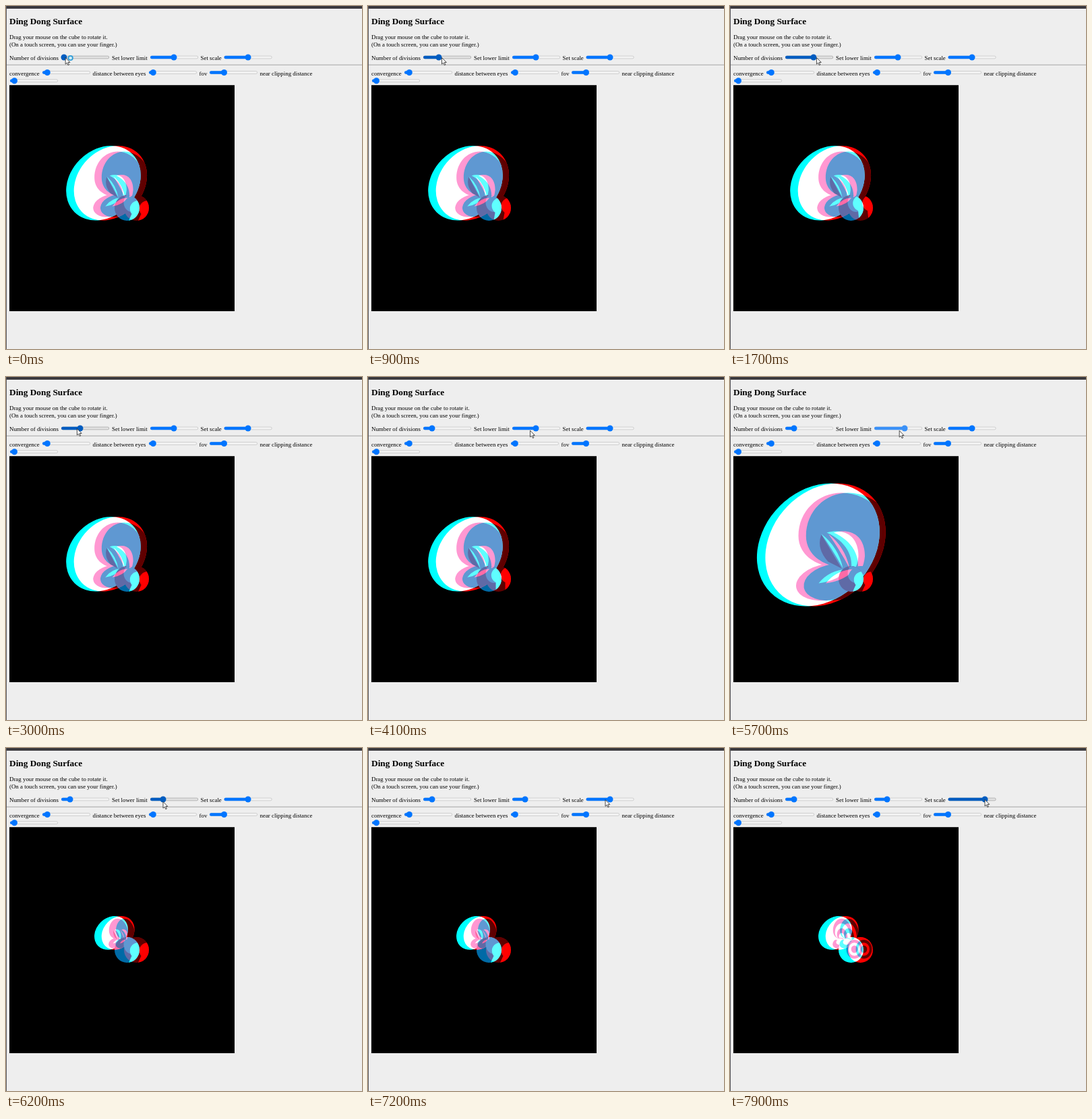
Write an HTML page that moves like this. It is 528x508 px and loops after 8000 ms.

```html
<!DOCTYPE html>
<html lang="en">
<head>
<meta charset="utf-8">
<title>Ding Dong Surface</title>
<style>
  html, body { margin: 0; width: 100%; height: 100%; overflow: hidden; background: #eee; }
  svg { display: block; font: 8.89px "Liberation Serif", "Times New Roman", serif; }
  .title { font-size: 13.33px; font-weight: bold; }
  .scene { isolation: isolate; }
  .eye { mix-blend-mode: screen; }
  .cyan { --hi: #0ff; --mid: #0098d2; --low: #006aa6; }
  .red { --hi: #f00; --mid: #5f0000; --low: #5f0000; }
  .hi { fill: var(--hi); }
  .mid { fill: var(--mid); }
  .low { fill: var(--low); }
</style>
</head>
<body>
<svg width="528" height="508" viewBox="0 0 528 508">
  <defs>
    <clipPath id="rim"><ellipse rx="100" ry="81" transform="translate(-34.6 -35) rotate(-45)"/></clipPath>
    <clipPath id="ball"><ellipse rx="18.5" ry="19"/></clipPath>
  </defs>
  <rect width="528" height="508" fill="#eee"/>
  <rect width="528" height="4" fill="#3b3a3e"/>
  <rect width="1" height="508" fill="#55555a"/>
  <text class="title" x="5" y="27">Ding Dong Surface</text>
  <text x="5" y="49">Drag your mouse on the cube to rotate it.</text>
  <text x="5" y="59.5">(On a touch screen, you can use your finger.)</text>
  <text x="5" y="80">Number of divisions</text>
  <text x="157" y="80">Set lower limit</text>
  <text x="288.5" y="80">Set scale</text>
  <path d="M1 87.2H528" stroke="#a6a6a6"/>
  <text x="5" y="102.5">convergence</text>
  <text x="128.5" y="102.5">distance between eyes</text>
  <text x="286.5" y="102.5">fov</text>
  <text x="376.5" y="102.5">near clipping distance</text>
  <g id="sliders"></g>
  <g class="scene">
    <rect x="5" y="117.2" width="334" height="334.8"/>
    <g class="eye cyan" id="left"></g>
    <g class="eye red" id="right"></g>
  </g>
  <g id="pointer">
    <path d="M0 0V9.6L2.2 7.6 3.9 11.2 5.4 10.5 3.8 7H6.8Z" fill="#fff" stroke="#222" stroke-width=".8"/>
    <circle id="busy" cx="7.5" cy=".5" r="3.2" fill="#c9ecf8" stroke="#2f9bd6" stroke-width="1.8"/>
  </g>
</svg>
<script>
const LOOP = 8000, STEP = 100, LAG = 150;
const $ = id => document.getElementById(id);
const mix = (a, b, p) => a + (b - a) * p;
const part = (t, from, to) => Math.min(1, Math.max(0, (t - from) / (to - from)));
const glide = (t, from, to) => {
  const p = part(t, from, to);
  return p * p * (3 - 2 * p);
};

// Thumb positions
const divisions = t => 86 + 45 * part(t, 100, 2000) - 21 * part(t, 2000, 3000) - 15 * part(t, 3000, 3400);
const lower = t => 249 + 10 * part(t, 4600, 5300) - 26 * part(t, 5700, 6200);
const scale = t => 359 + 19 * part(t, 7400, 7900);

const COLORS = { idle: "#0075ff", hover: "#005cc0", active: "#3b91f7" };

function slider(x, y, thumb, state = "idle") {
  const color = COLORS[state], hover = state === "hover";
  return `<rect x="${x + .3}" y="${y - 1.9}" width="70.4" height="3.8" rx="1.9"
      fill="${hover ? "#e2e2e2" : "#f3f3f3"}" stroke="${hover ? "#929292" : "#b8b8b8"}" stroke-width=".6"/>
    <rect x="${x}" y="${y - 2.2}" width="${thumb - x}" height="4.4" rx="2.2" fill="${color}"/>
    <circle cx="${thumb}" cy="${y}" r="4.5" fill="${color}"/>`;
}

const place = (transform, art) => `<g transform="${transform}">${art}</g>`;
const shape = (tone, d) => `<path class="${tone}" d="${d}"/>`;
const oval = (tone, x, y, rx, ry, turn = 0) =>
  `<ellipse class="${tone}" rx="${rx}" ry="${ry}" transform="translate(${x} ${y}) rotate(${turn})"/>`;

// Alternating tones on shrinking copies of one shape
const nest = (count, shrink, art) => Array.from({ length: count }, (_, i) =>
  place(`scale(${1 - i * shrink})`, art(i % 2 ? "hi" : "mid"))).join("");

// The funnel is drawn around its apex
const upper = tone => shape(tone, "M0 0C-46-3-64-25-64-48C-64-85-35-112 0-112C45-112 85-70 85 0L30 10Z");
const under = tone => oval(tone, -20, 20, 48, 27, -10);
const folds =
  shape("low", "M-30-50L0 0L-20-10Q-38-30-30-50Z") +
  shape("hi", "M-30-51Q-5-32 2 0Q-12-26-30-51Z") +
  shape("hi", "M-22-53C5-60 25-48 25-18Q24-6 19 2H14C18-20 4-42-22-53Z") +
  shape("hi", "M-34 22Q-18 2 9 1Q-4 18-34 22Z");

function funnel(size, bands) {
  const k = size / 91;
  const art = bands
    ? nest(bands, .23, upper) + nest(2, .4, under) + shape("hi", "M-90 0Q-20-14 40 8Q-20 4-90 0Z")
    : upper("mid") + under("mid") + folds;
  return place(`translate(165.5 283.5) scale(${k})`, `<g clip-path="url(#rim)">
    ${oval("hi", -35, -35, 140, 140)}${place(`scale(${k ** .25} 1)`, art)}</g>`);
}

function ball(tilt, bands) {
  const art = bands
    ? oval("hi", 0, 0, 20, 20) + place("translate(5 -1)", nest(bands - 1, .3, tone => oval(tone, 0, 0, 12, 14)))
    : oval("low", 0, 0, 20, 20) + oval("mid", 7.5, -8, 12.5, 14) +
      place(`rotate(${tilt})`, shape("hi", "M19-11C5-11 1 1 7 9L2 20H20Z"));
  return place("translate(179.5 299)", `<g clip-path="url(#ball)">${art}</g>`);
}

function draw(t) {
  const div = divisions(t), low = lower(t), d = low - 249;
  const size = 55.3 + 2.926 * d + .0644 * d * d;
  const bands = Math.round(4 * part(t, 7400, 7900));
  const tilt = d ? 0 : -30 * Math.sin((div - 86) / 8) ** 2;
  const flare = funnel(size, bands), drop = ball(tilt, bands);
  $("left").innerHTML = flare + drop;
  $("right").innerHTML = place("translate(13.3 0) scale(.98 1)", flare) + place("translate(14 0)", drop);

  const lowState = t >= 5400 && t < 5900 ? "active" : t >= 4400 && t < 6600 ? "hover" : "idle";
  $("sliders").innerHTML =
    slider(82, 76, div, t < 3600 ? "hover" : "idle") +
    slider(214, 76, low, lowState) +
    slider(323.5, 76, scale(t), t >= 7300 ? "hover" : "idle") +
    slider(54, 98.5, 61.3) + slider(212, 98.5, 218.3) + slider(302, 98.5, 323.5) + slider(6, 110.7, 12.5);

  // The mouse runs a little ahead of the thumb it drags
  const ahead = t + LAG, toLower = glide(t, 3500, 4200), toScale = glide(t, 6600, 7300);
  const x = mix(mix(divisions(ahead) + 1, lower(ahead), toLower), scale(t), toScale);
  const y = 76.5 + 3 * (toLower - toScale);
  $("pointer").setAttribute("transform", `translate(${x} ${y})`);
  $("busy").setAttribute("visibility", t < 200 ? "visible" : "hidden");
}

let shown = -1;
function tick() {
  const t = Math.floor(performance.now() % LOOP / STEP) * STEP;
  if (t !== shown) draw(shown = t);
  requestAnimationFrame(tick);
}
tick();
</script>
</body>
</html>
```
